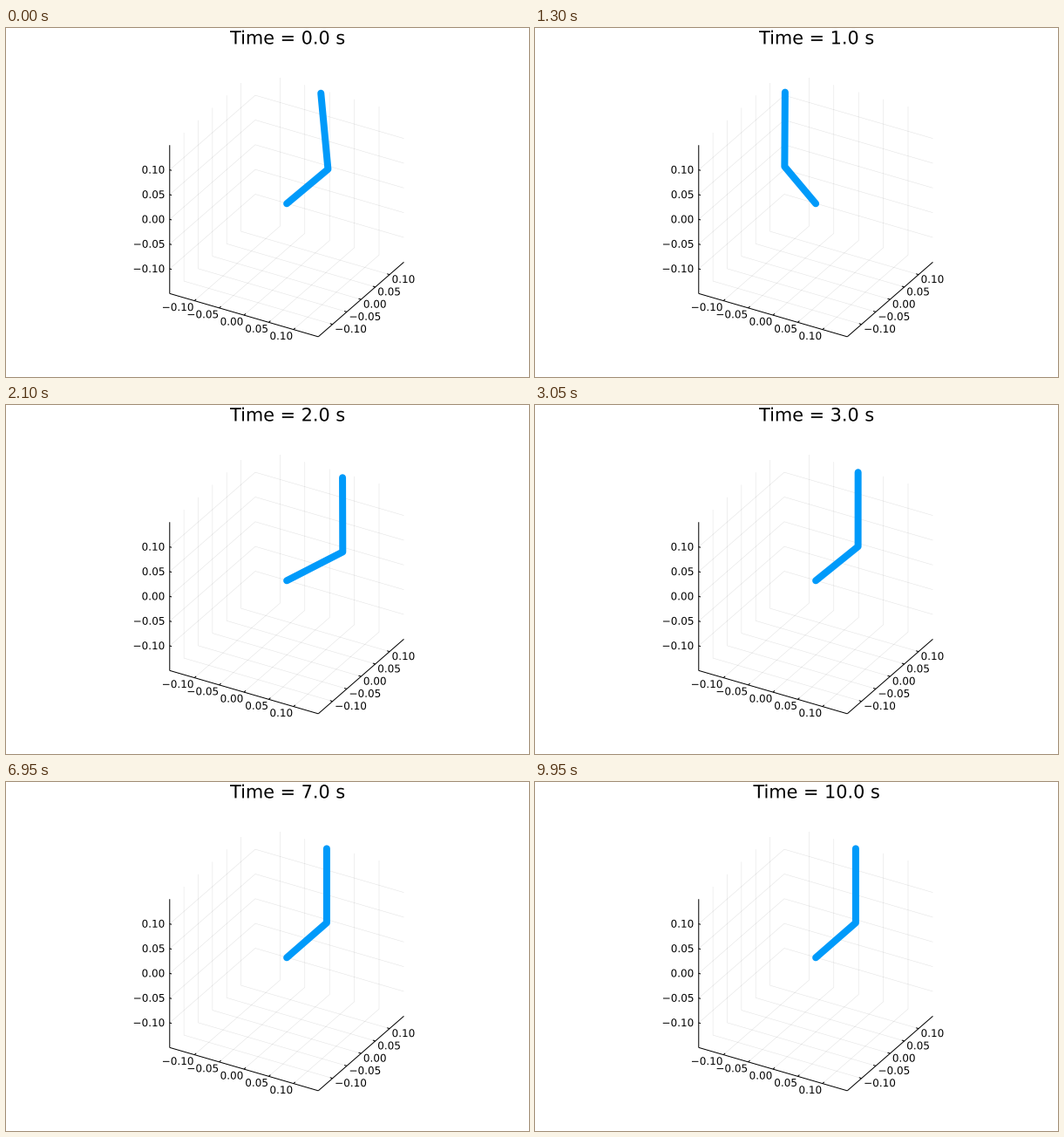
A matplotlib script for the animation above (10 s loop, 600 px wide and 400 px high).

```python
import math

import numpy as np
import matplotlib.pyplot as plt
from matplotlib.animation import FuncAnimation
from matplotlib.collections import LineCollection
from matplotlib.patches import PathPatch
from matplotlib.textpath import TextPath
from matplotlib.transforms import Affine2D

W, H, DPI = 600, 400, 100
FRAMES, DT = 200, 0.05
PX = 72 / DPI  # points per pixel
LIM = 0.15
ARM, ROD = 0.14, 0.15
PEAK, DIP = 1.44, -0.276
START, T_PEAK, T_DIP = 0.05, 0.6, 2.25

plt.rcParams["font.family"] = "DejaVu Sans"


def project(x, y, z):
    """Orthographic view of the box, in stage pixels."""
    return (322.1 + 568.3 * x + 327.2 * y,
            201.3 + 165 * x - 285 * y - 567 * z)


def ease(a, b, s):
    return a + (b - a) * (1 - math.cos(math.pi * s)) / 2


def arm_angle(t):
    """Swing out, swing back past zero, then settle critically damped."""
    if t < T_PEAK:
        return ease(-0.019, PEAK, (t - START) / (T_PEAK - START))
    if t < T_DIP:
        return ease(PEAK, DIP, ((t - T_PEAK) / (T_DIP - T_PEAK)) ** 1.26)
    k = 4.25 * (t - T_DIP)
    return DIP * (1 + k) * math.exp(-k)


def rod_angle(t):
    return -0.1565 * math.exp(-1.8 * t) * math.sin(2.66 * (t - 0.33))


def linkage(t):
    theta, alpha = arm_angle(t), rod_angle(t)
    s, c = math.sin(theta), math.cos(theta)
    joint = np.array([-ARM * s, ARM * c, 0.0])
    lean = ROD * math.sin(alpha)
    tip = joint + [-c * lean, -s * lean, ROD * math.cos(alpha)]
    return zip(*(project(*p) for p in ((0, 0, 0), joint, tip)))


fig = plt.figure(figsize=(W / DPI, H / DPI), dpi=DPI, facecolor="white")
ax = fig.add_axes([0, 0, 1, 1])
ax.set_xlim(0, W)
ax.set_ylim(H, 0)
ax.axis("off")


def segments(pairs, width, **kw):
    lines = [[project(*a), project(*b)] for a, b in pairs]
    ax.add_collection(LineCollection(lines, colors="black", snap=False,
                                     linewidths=width * PX, **kw))


def glyphs(text, x, y, size, align):
    """Text outline in stage pixels; align 0 starts, 0.5 centres, 1 ends at x."""
    path = TextPath((0, 0), text, size=size)
    box = path.get_extents()
    shift = align * (box.x0 + box.x1 if align == 0.5 else box.x1)
    return Affine2D().scale(1, -1).translate(x - shift, y).transform_path(path)


def label(value, x, y, align):
    text = f"{value:.2f}".replace("-", "\u2212")
    ax.add_patch(PathPatch(glyphs(text, x, y, 12, align), fc="black", lw=0))


lo, hi = -LIM, LIM
grid, marks = [], []
for n in range(-2, 3):
    k = n * 0.05
    grid += [
        ((k, lo, lo), (k, hi, lo)), ((lo, k, lo), (hi, k, lo)),
        ((k, hi, lo), (k, hi, hi)), ((lo, hi, k), (hi, hi, k)),
        ((lo, k, lo), (lo, k, hi)), ((lo, lo, k), (lo, hi, k)),
    ]
    marks += [
        ((k, lo, lo), (k, lo + 0.006, lo)),
        ((hi, k, lo), (hi - 0.005, k, lo)),
        ((lo, lo, k), (lo + 0.004, lo, k)),
    ]
    x, y = project(k, lo, lo)
    label(k, x - 1.5, y + 11.5, 1)
    x, y = project(hi, k, lo)
    label(k, x + 2.5, y + 9.5, 0)
    x, y = project(lo, lo, k)
    label(k, x - 6.3, y + 4.1, 1)

edges = [((lo, lo, lo), (lo, lo, hi)), ((lo, lo, lo), (hi, lo, lo)),
         ((hi, lo, lo), (hi, hi, lo))]
segments(grid, 0.6, alpha=0.1, zorder=1)
segments(edges + marks, 1.0, zorder=2)

bar, = ax.plot([], [], color="#009AFA", lw=8 * PX, zorder=4,
               solid_capstyle="round", solid_joinstyle="round")
title = ax.add_patch(PathPatch(glyphs("Time", 0, 0, 20.8, 0), fc="black", lw=0))


def update(i):
    step = i + 1
    bar.set_data(*linkage(step * DT))
    text = f"Time = {step // 20}.0 s"
    title.set_path(glyphs(text, 322.6, 18.4, 20.8, 0.5))
    return bar, title


anim = FuncAnimation(fig, update, frames=FRAMES, interval=50,
                     repeat=True, repeat_delay=0)
plt.show()
```
